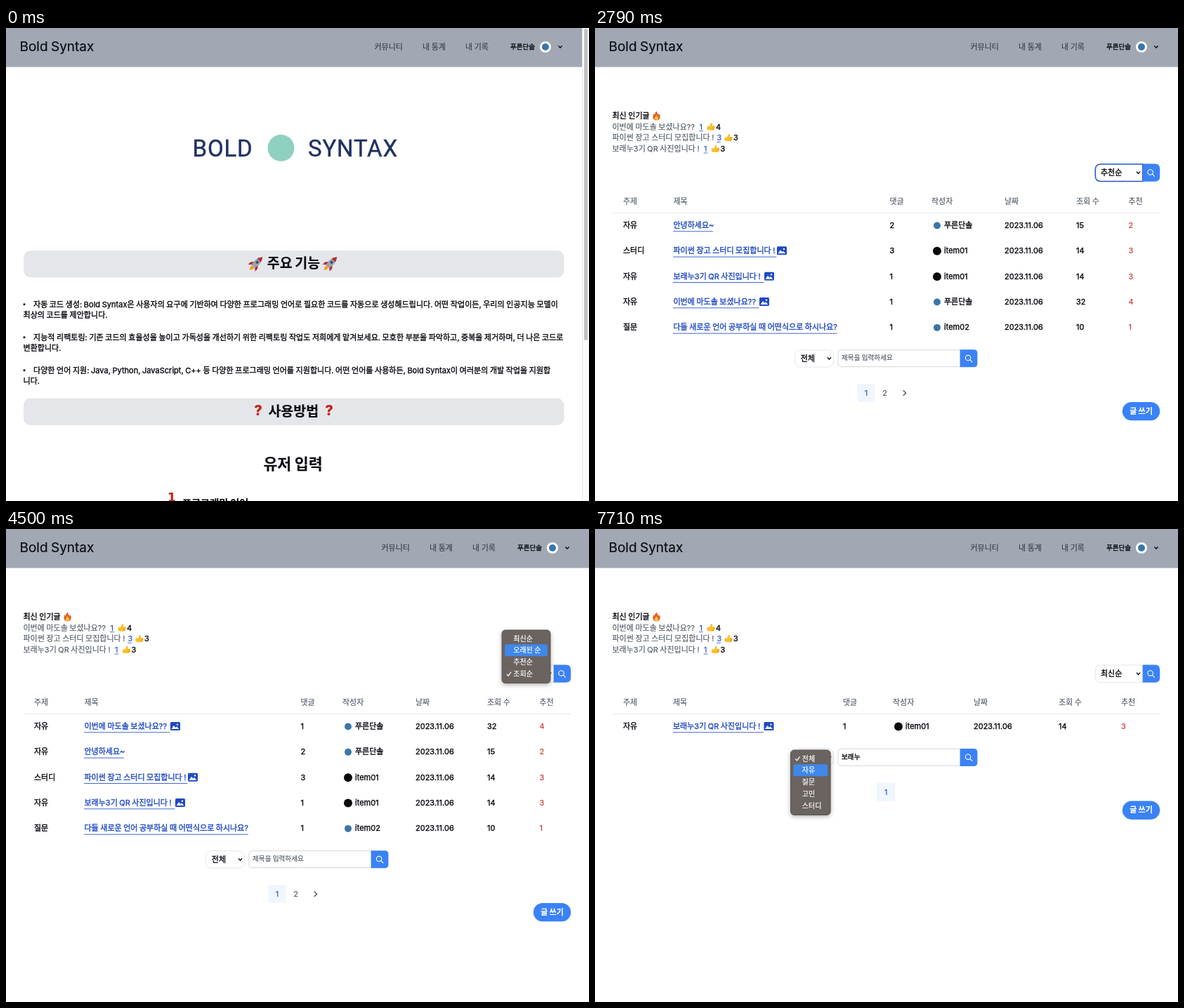
These frames come from a looping animation (830 px wide and 674 px high, 8 s). An HTML page:

```html
<!DOCTYPE html>
<html lang="ko">
<head>
<meta charset="utf-8">
<title>Bold Syntax</title>
<style>
html, body { margin: 0; width: 100%; height: 100%; overflow: hidden; background: #fff; }
svg { display: block; width: 830px; height: 674px; }
text {
  --ink: #0b0d12;
  font: 400 11px Inter, 'Noto Sans CJK KR', 'Noto Sans CJK JP', sans-serif;
  word-spacing: -.05em; fill: var(--ink); stroke: var(--ink); stroke-width: .12px;
}
.m { stroke-width: .36px; }
.mid { text-anchor: middle; }
.gray { --ink: #4b5563; }
.nav { --ink: #343c49; }
.link { --ink: #1f49c4; }
.like { --ink: #c62f2c; }
.name { font-size: 9.5px; stroke-width: .3px; }
.in { font-size: 9.6px; }
.opt { --ink: #fff; font-size: 10px; stroke-width: .2px; }
.post { --ink: #fff; font-weight: 600; text-anchor: middle; }
.para { letter-spacing: .03px; }
.brand { font-size: 19px; stroke-width: .2px; }
.logo { --ink: #1f3160; font: 400 33px Roboto, sans-serif; letter-spacing: .8px; stroke-width: .4px; }
.end { text-anchor: end; }
.h2 { font-size: 19.5px; font-weight: 700; text-anchor: middle; }
.h3 { font-size: 21.7px; font-weight: 600; text-anchor: middle; }
.h4 { font-size: 14.2px; font-weight: 600; }
.ask { --ink: #c4221b; font-size: 20px; font-weight: 800; text-anchor: middle; }
.num { --ink: #c0261c; font: 700 17px 'DejaVu Sans', sans-serif; }
.line { fill: none; stroke-linecap: round; stroke-linejoin: round; }
</style>
</head>
<body>
<svg id="stage" viewBox="0 0 830 674">
  <defs>
    <g id="lens" class="line" stroke="#fff" stroke-width="1.1">
      <circle cx="-.9" cy="-.9" r="3.7"/><path d="M1.9 1.9L5 5"/>
    </g>
    <path id="down" class="line" d="M-2.2-1.2L0 1.2L2.2-1.2" stroke="#111" stroke-width="1.4"/>
    <path id="tick" class="line" d="M-2.8 .3L-1 2.4L2.8-2.8" stroke="#fff" stroke-width="1.3"/>
    <g id="pic">
      <rect width="14" height="12" rx="1.6" fill="#1f49c4"/>
      <path d="M1.6 10L5 5L7.4 8L9 6.3L12.4 10Z" fill="#fff"/>
      <circle cx="10" cy="3.6" r="1.2" fill="#fff"/>
    </g>
    <circle id="blue" r="5" fill="#3b76a8"/>
    <circle id="black" r="6" fill="#0a0a0a"/>
    <g id="nobody">
      <circle r="6.3" fill="#cfd3da"/><circle cy="-1.7" r="2" fill="#fff"/>
      <path d="M-3.6 3.8Q-3.4 .9 0 .9T3.6 3.8Q0 6 -3.6 3.8Z" fill="#fff"/>
    </g>
    <g id="rocket" transform="rotate(45)">
      <path d="M-2 6Q-3 10 0 13Q3 10 2 6Z" fill="#f59a23"/>
      <path d="M-3-1L-7 4V9L-2.5 5ZM3-1L7 4V9L2.5 5Z" fill="#b52f28"/>
      <path d="M0-13Q6.5-4 3 6H-3Q-6.5-4 0-13Z" fill="#9aa3ae"/>
      <path d="M0-13Q2.8-9 3.6-6H-3.6Q-2.8-9 0-13Z" fill="#b52f28"/>
      <circle cy="-2.2" r="2" fill="#27507f"/>
    </g>
    <g id="fire">
      <path d="M0-6.5Q1-3 3.6-1L4-3Q6 0 5 3Q3.8 6.5 0 6.5T-5 3Q-5.6 0-3.6-3L-2.7-1.5Q-2-4 0-6.5Z" fill="#ee5a24"/>
      <path d="M0-1Q1 1 2.6 2.5Q3 6 0 6T-2.8 3Q-1.6 2 0-1Z" fill="#fcc93a"/>
    </g>
    <g id="thumb">
      <path d="M-5.5-.6H-2L.4-5.6Q2.6-5.6 2-3L1.5-1.4H4.6Q6-1 5.6 .4Q6 1.4 5.2 2.2Q5.2 3.4 4.3 3.8Q4 5 2.8 5H-1.6L-5.5 4.2Z" fill="#fbbf2d"/>
      <path d="M2.4 .7H5.2M2.2 2.3H5M2 3.8H4" stroke="#d6921a" stroke-width=".6"/>
    </g>
    <filter id="soft" x="-30%" y="-30%" width="160%" height="160%">
      <feDropShadow dx="0" dy="2" stdDeviation="3" flood-opacity=".3"/>
    </filter>
  </defs>
  <g id="view"></g>
</svg>
<script>
const LOOP = 8000, ROW = 36.35, BLUE = '#3b82f6';
const SORTS = ['최신순', '오래된 순', '추천순', '조회순'];
const TOPICS = ['전체', '자유', '질문', '고민', '스터디'];

// topic, title, underline end, picture, comments, avatar, author, views, likes
const POSTS = [
  ['고민', '취업에 대한 고민..', 192, 0, 0, 'nobody', 'item03', 4, 1],
  ['질문', '다들 새로운 언어 공부하실 때 어떤식으로 하시나요?', 344.5, 0, 1, 'blue', 'item02', 10, 1],
  ['자유', '이번에 마도솔 보셨나요??', 233, 1, 1, 'blue', '푸른단솔', 32, 4],
  ['자유', '보래누3기 QR 사진입니다 !', 240, 1, 1, 'black', 'item01', 14, 3],
  ['스터디', '파이썬 장고 스터디 모집합니다 !', 258, 1, 3, 'black', 'item01', 14, 3],
  ['자유', '안녕하세요~', 167.5, 0, 2, 'blue', '푸른단솔', 15, 2]
];
const HEADS = ['주제', '제목', '댓글', '작성자', '날짜', '조회 수', '추천'];
const WIDE = [40, 111.5, 419.5, 479, 583, 685, 759.5];
const TIGHT = [40, 111, 353, 424, 539, 660, 749];

// Each step changes part of the state at a given time.
const STEPS = [
  [0, { page: 'home', order: '01234', sort: 0, menu: false, hover: 0, focus: false, input: false, caret: false, text: '', compose: false, pick: false }],
  [420, { page: 'board' }],
  [1560, { menu: true, hover: 0 }],
  [1650, { hover: 1 }],
  [1800, { menu: false, sort: 1, focus: true }],
  [2130, { focus: false, order: '54321' }],
  [2310, { menu: true, hover: 1 }],
  [2610, { hover: 2 }],
  [2760, { menu: false, sort: 2, focus: true }],
  [3090, { focus: false, order: '24351' }],
  [3450, { menu: true, hover: 2 }],
  [3540, { hover: 3 }],
  [3780, { menu: false, sort: 3, focus: true }],
  [4110, { focus: false, order: '25431' }],
  [4320, { menu: true, hover: 3 }],
  [4410, { hover: 2 }],
  [4500, { hover: 1 }],
  [4650, { hover: 0 }],
  [4740, { menu: false, sort: 0, focus: true }],
  [5070, { focus: false, order: '01234' }],
  [5460, { input: true, caret: true }],
  [5670, { caret: false }],
  ...['ㅂ', '보', '볼', '보래', '보랜', '보래누'].map((text, i) =>
    [5910 + i * 78, { text, compose: true, caret: true }]),
  [6540, { compose: false }],
  [6630, { page: 'found', order: '3', input: false, caret: false }],
  [7590, { pick: true, hover: 0 }],
  [7710, { hover: 1 }]
];
let last = {};
const states = STEPS.map(([at, change]) => last = { ...last, ...change, at });

const text = (x, y, s, cls = '') => `<text x="${x}" y="${y}" class="${cls}">${s}</text>`;
const box = (x, y, w, h, r, fill, more = '') =>
  `<rect x="${x}" y="${y}" width="${w}" height="${h}" rx="${r}" fill="${fill}" ${more}/>`;
const use = (id, x, y) => `<use href="#${id}" x="${x}" y="${y}"/>`;
const stroke = (d, color, w = 1) => `<path class="line" d="${d}" stroke="${color}" stroke-width="${w}"/>`;
const shape = (d, fill, color = 'none', w = 1) => `<path d="${d}" fill="${fill}" stroke="${color}" stroke-width="${w}"/>`;
const leftRound = (x, y, w, h, r) =>
  `M${x + w} ${y}H${x + r}Q${x} ${y} ${x} ${y + r}V${y + h - r}Q${x} ${y + h} ${x + r} ${y + h}H${x + w}Z`;
const rightRound = (x, y, w, h, r) =>
  `M${x} ${y}H${x + w - r}Q${x + w} ${y} ${x + w} ${y + r}V${y + h - r}Q${x + w} ${y + h} ${x + w - r} ${y + h}H${x}Z`;

function header(dx, width) {
  return box(0, 0, width, 55.6, 0, '#a1a8b4') + text(19.5, 33, 'Bold Syntax', 'brand') +
    text(524.5 + dx, 30.5, '커뮤니티', 'nav') + text(593 + dx, 30.5, '내 통계', 'nav') +
    text(654 + dx, 30.5, '내 기록', 'nav') + text(718 + dx, 30, '푸른단솔', 'name') +
    `<circle cx="${768 + dx}" cy="27" r="8" fill="#fff"/>` +
    use('blue', 768 + dx, 27) + use('down', 789 + dx, 27);
}

function home() {
  const bullet = (y, a, b) => `<circle cx="26" cy="${y - 3.7}" r="1.5"/>` +
    text(39, y, a, 'm para') + text(24.5, y + 15.6, b, 'm para');
  return header(0, 820) +
    box(820, 0, 10, 674, 0, '#fafafa') + box(820, 0, 1, 674, 0, '#e8e8e8') + box(823, 1, 5, 444, 2.5, '#c1c1c1') +
    text(351.5, 183, 'BOLD', 'logo end') + '<circle cx="391.5" cy="171" r="19" fill="#8fd0c1"/>' +
    text(430, 183, 'SYNTAX', 'logo') +
    box(25, 317, 769.5, 38.5, 10, '#e5e6ea') + text(409.5, 342, '주요 기능', 'h2') +
    use('rocket', 356, 335.5) + use('rocket', 462, 335.5) +
    bullet(397.5, '자동 코드 생성: Bold Syntax은 사용자의 요구에 기반하여 다양한 프로그래밍 언어로 필요한 코드를 자동으로 생성해드립니다. 어떤 작업이든, 우리의 인공지능 모델이', '최상의 코드를 제안합니다.') +
    bullet(444.5, '지능적 리팩토링: 기존 코드의 효율성을 높이고 가독성을 개선하기 위한 리팩토링 작업도 저희에게 맡겨보세요. 모호한 부분을 파악하고, 중복을 제거하며, 더 나은 코드로', '변환합니다.') +
    bullet(491.5, '다양한 언어 지원: Java, Python, JavaScript, C++ 등 다양한 프로그래밍 언어를 지원합니다. 어떤 언어를 사용하든, Bold Syntax이 여러분의 개발 작업을 지원합', '니다.') +
    box(25, 527.5, 769.5, 38.5, 10, '#e5e6ea') + text(409.3, 553, '사용방법', 'h2') +
    text(359, 552, '?', 'ask') + text(460, 552, '?', 'ask') + text(408.5, 629, '유저 입력', 'h3') +
    text(230, 674.5, 1, 'num') + text(251, 682, '프로그래밍 언어', 'h4');
}

function popular() {
  const line = (y, title, x, n, likes) => text(24.5, y, title, 'gray') + text(x, y, n, 'link') +
    stroke(`M${x} ${y + 2}h5`, '#1f49c4', .8) + use('thumb', x + 16.5, y - 4) + text(x + 23.5, y, likes, 'm');
  return text(24.5, 129, '최신 인기글', 'm') + use('fire', 87.5, 125) +
    line(144.7, POSTS[2][1], 148.5, 1, 4) + line(160.3, POSTS[4][1], 173.5, 3, 3) + line(176, POSTS[3][1], 155, 1, 3);
}

function table(order, cols) {
  const rows = [...order].map((id, i) => {
    const [topic, title, end, pic, notes, face, author, views, likes] = POSTS[id];
    const y = 285 + i * ROW, dx = cols[1] - 111.5;
    return text(cols[0], y, topic, 'm') + text(cols[1], y, title, 'link m') +
      stroke(`M${cols[1]} ${y + 4.8}H${end + dx}`, '#2b56cc', .9) + (pic ? use('pic', end + 1 + dx, y - 10) : '') +
      text(cols[2], y, notes, 'm') + use(face, cols[3] + 8, y - 3.5) + text(cols[3] + 18, y, author, 'm') +
      text(cols[4], y, '2023.11.06', 'm') + text(cols[5], y, views, 'm') + text(cols[6], y, likes, 'like');
  });
  return HEADS.map((h, i) => text(cols[i], 250.5, h, 'gray')).join('') +
    box(25, 263, 779, 1, 0, '#e5e7eb') + rows.join('');
}

function menu(x, y, w, items, checked, hover) {
  const rows = items.map((s, i) => {
    const base = y + 15.5 + i * 16.8;
    return (i === hover ? box(x + 4, base - 12, w - 8, 17, 3, '#3f88ea') : '') +
      (i === checked ? use('tick', x + 10, base - 3) : '') + text(x + 16.3, base, s, 'opt');
  });
  return box(x, y, w, items.length * 16.8 + 8.5, 5, '#6a6361', 'stroke="#4d4846" stroke-width=".8" filter="url(#soft)"') +
    rows.join('');
}

function sorter(s) {
  const button = rightRound(779.7, 193.5, 24.5, 25.3, 7);
  return shape(leftRound(712.3, 194, 67.5, 24.5, 8), '#fff', s.focus ? '#2459bd' : '#e3e5e9', s.focus ? 1.6 : 1) +
    text(720, 209.7, SORTS[s.sort], 'm') + use('down', 773.5, 206.3) + shape(button, BLUE) +
    `<path id="hot" d="${button}" fill="#d84b56" opacity="0"/>` + use('lens', 791.5, 206.3);
}

function field(s) {
  const edge = leftRound(346, 458.7, 174, 24, 5);
  const at = 351 + (s.text.length - 1) * 8.85;
  const frame = s.input
    ? shape(edge, '#fff', '#8db8f3', 2) + shape(leftRound(347.2, 459.9, 172, 21.6, 4), '#fff', '#234f8f', 1.4)
    : shape(edge, '#fff', '#d4d7dd');
  return frame +
    (s.text ? text(351, 473.3, s.text, 'in m') : text(351, 473.3, '제목을 입력하세요', 'in gray')) +
    (s.compose ? box(at, 475, 9, 1, 0, '#111') : '') +
    (s.caret ? box(s.text ? at + 9 : 351, 465, 1, 12, 0, '#111') : '');
}

function footer(s, found) {
  const pages = found
    ? box(401.3, 507.2, 26, 26, 0, '#eff6ff') + text(414.3, 524, 1, 'link mid')
    : box(373.5, 507.2, 25, 25.5, 0, '#eff6ff') + text(386, 524, 1, 'link mid') +
      text(412.5, 524, 2, 'gray mid') + stroke('M439.2 516.8L442.6 520.2L439.2 523.6', '#4b5563', 1.4);
  return `<g transform="translate(0 ${found ? -4 * ROW : 0})">` +
    box(284.7, 458.7, 55, 24.5, 8, '#fff', 'stroke="#e3e5e9"') + text(292.8, 474.7, '전체', 'm') +
    use('down', 333.5, 471) + field(s) +
    shape(rightRound(519.7, 458.3, 24.7, 25, 5), BLUE) + use('lens', 532, 471) +
    pages + box(750.8, 533, 53.4, 26.3, 13.1, BLUE) + text(777.5, 549.8, '글 쓰기', 'post') + '</g>';
}

function board(s) {
  const found = s.page === 'found';
  return header(10, 830) + popular() + sorter(s) + table(s.order, found ? TIGHT : WIDE) + footer(s, found) +
    (s.menu ? menu(706, 194.4 - 16.8 * s.sort, 69, SORTS, s.sort, s.hover) : '') +
    (s.pick ? menu(278.5, 315, 56.7, TOPICS, 0, s.hover) : '');
}

const view = document.getElementById('view');
const start = performance.now();
let shown = null;

function draw() {
  const t = (performance.now() - start) % LOOP;
  const s = states.findLast(step => step.at <= t);
  if (s !== shown) {
    view.innerHTML = s.page === 'home' ? home() : board(s);
    shown = s;
  }
  if (s.focus) {
    const heat = Math.min(1, Math.max(0, (t - s.at - 60) / 130));
    document.getElementById('hot').setAttribute('opacity', heat);
  }
  requestAnimationFrame(draw);
}
draw();
</script>
</body>
</html>
```
